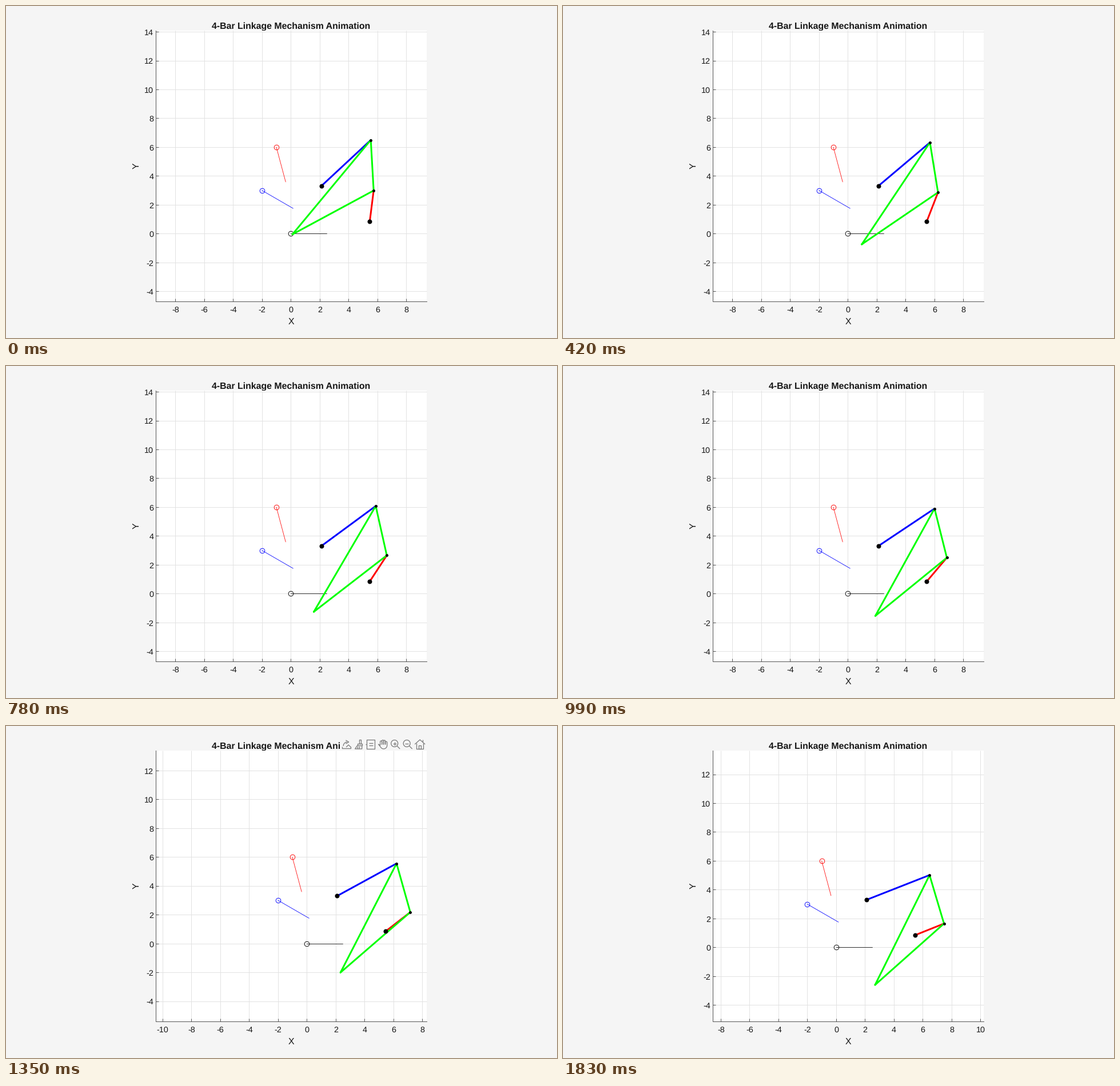
These frames come from a looping animation (964 by 581 pixels, 1.86 s). A matplotlib script:

```python
import numpy as np
import matplotlib.pyplot as plt
from matplotlib.animation import FuncAnimation
from matplotlib.collections import LineCollection
from matplotlib.patches import Rectangle

W, H, DPI = 964, 581, 100
FRAMES, INTERVAL = 62, 30
PT = 72 / DPI
LEFT, RIGHT, TOP, BOTTOM = 262, 735.6, 43.3, 517
UNIT = 25.24
TICK = 4.7
BG, INK, GRID, RULE = "#f5f5f5", "#161616", "#e2e2e2", "#555555"
BLUE, RED, GREEN = "#0000ff", "#ff0000", "#00ff00"

# Linkage geometry in data units
PIVOT_A = np.array([2.113, 3.297])
PIVOT_B = np.array([5.475, 0.847])
ROCKER, CRANK, COUPLER = 4.69, 2.158, 3.509
TIP_ALONG, TIP_SIDE = 6.22, -5.79
START_ANGLE = 82.8
POSES = [((0, 0), 0, "black"), ((-2, 3), -30, BLUE), ((-1, 6), -75, RED)]

# The view is dragged by hand: plot origin in pixels before, midway and after
HOME, PULLED, DROPPED = np.array([[498.2, 398.4], [526.1, 380.6], [477.8, 387.4]])
DRAG_START, DRAG_TURN, DRAG_END = 38, 45, 52

plt.rcParams["font.family"] = "Liberation Sans"
plt.rcParams["text.hinting"] = "none"
fig = plt.figure(figsize=(W / DPI, H / DPI), dpi=DPI, facecolor=BG)
ax = fig.add_axes([0, 0, 1, 1])
ax.set_xlim(0, W)
ax.set_ylim(H, 0)
ax.axis("off")

panel = Rectangle((LEFT, TOP), RIGHT - LEFT, BOTTOM - TOP, fc="white", ec="none", zorder=1)
ax.add_patch(panel)


def label(x, y, text, size, **kw):
    return ax.text(x, y, text, fontsize=size * PT, color=INK, **kw)


def stroke(color, width, z):
    line, = ax.plot([], [], color=color, lw=width * PT, zorder=z,
                    solid_capstyle="round", solid_joinstyle="round")
    line.set_clip_path(panel)
    return line


def dots(size, z, color="black", **kw):
    line, = ax.plot([], [], "o", color=color, ms=size * PT, zorder=z, **kw)
    line.set_clip_path(panel)
    return line


def segments(paths, color, width, z):
    return ax.add_collection(LineCollection(paths, colors=color, linewidths=width * PT,
                                            zorder=z))


label(498.6, 39.9, "4-Bar Linkage Mechanism Animation", 15.9,
      weight="bold", ha="center", zorder=0.5)
label(498.6, 557, "X", 15.9, ha="center")
label(228.8, 279.6, "Y", 15.9, rotation=90, ha="center", va="center")

grid = segments([], GRID, 1, 2)
ticks = segments([], RULE, 1, 3)
ax.plot([LEFT, LEFT, RIGHT], [TOP, BOTTOM, BOTTOM], color=RULE, lw=PT, zorder=3)

VALUES = range(-12, 17, 2)
x_labels = {v: label(0, 535.6, str(v), 14.4, ha="center") for v in VALUES}
y_labels = {v: label(258.4, 0, str(v), 14.4, ha="right") for v in VALUES}

pose_marks = [(np.array(p, float), np.radians(a), stroke(c, 0.8, 4),
               dots(8.6, 4, c, mfc="none", mew=0.9 * PT)) for p, a, c in POSES]
rocker = stroke(BLUE, 3, 5)
crank = stroke(RED, 3, 5)
coupler = stroke(GREEN, 3, 6)
pivots = dots(8, 7, mew=0)
joints = dots(5, 7, mew=0)


# Toolbar icons, each drawn around (0, 0)
def arc(cx, cy, r, a0=0, a1=360, n=24):
    t = np.radians(np.linspace(a0, a1, n))
    return list(zip(cx + r * np.cos(t), cy + r * np.sin(t)))


def box(x, y, w, h):
    return [(x, y), (x + w, y), (x + w, y + h), (x, y + h), (x, y)]


def bar(x, y, half):
    return [(x - half, y), (x + half, y)]


def share_icon():
    head = arc(1, -4, 3.5, -120, 120, 3)
    return [arc(2, 3, 7, 180, 265), head, arc(4, 5, 4, 180, 360, 3),
            [(-7, 4), (-7, 7), (8, 7), (8, 4)]]


def brush_icon():
    skirt = [(-2, 2), (-6, 8), (6, 8), (6, 2)]
    bristles = [[(x, 4), (x - 1, 8)] for x in (-1, 2)]
    return [box(1, -8, 3, 7), box(-2, -1, 8, 3), skirt, *bristles]


def tip_icon():
    return [box(-7, -8, 14, 16), bar(0.5, -2, 3.5), bar(0.5, 2, 3.5), bar(-8, 0, 1)]


def hand_icon():
    outline = [(-5, 2)]
    for i in range(4):
        x, y = 3 * i - 3.5, 0.9 * (i - 1.3) ** 2 - 6
        outline += [(x - 1.5, 0), *arc(x, y, 1.5, 180, 360, 8), (x + 1.5, 0)]
    return [outline + arc(1, 2, 6, 0, 150) + [(-8, 0), (-5, 2)]]


def zoom_icon(plus):
    parts = [arc(-1.5, -1.5, 6), [(3, 3), (8, 8)], bar(-1.5, -1.5, 3)]
    return parts + [[(y, x) for x, y in parts[-1]]] * plus


def home_icon():
    return [[(-9, 0), (0, -8), (9, 0)], [(-6, -2), (-6, 8), (6, 8), (6, -2)],
            box(-2, 2, 4, 6), [(5, -4), (5, -8)]]


icons = [share_icon(), brush_icon(), tip_icon(), hand_icon(),
         zoom_icon(True), zoom_icon(False), home_icon()]
icon_paths = [np.array(path) + (595.2 + 21.5 * i, 32)
              for i, icon in enumerate(icons) for path in icon]
toolbar = [ax.add_patch(Rectangle((585, 23), 154, 20, fc=BG, ec="none", zorder=8)),
           segments(icon_paths, "#7c7c7c", 1.3, 9)]


def solve(step):
    """Joint positions of the linkage after `step` degrees of crank travel."""
    t = np.radians(START_ANGLE - step)
    q = PIVOT_B + CRANK * np.array([np.cos(t), np.sin(t)])
    d = np.hypot(*(q - PIVOT_A))
    u = (q - PIVOT_A) / d
    a = (ROCKER**2 - COUPLER**2 + d**2) / (2 * d)
    p = PIVOT_A + a * u + np.sqrt(ROCKER**2 - a**2) * np.array([-u[1], u[0]])
    e = (q - p) / COUPLER
    tip = p + TIP_ALONG * e + TIP_SIDE * np.array([-e[1], e[0]])
    return p, q, tip


def view_origin(step):
    out = np.clip((step - DRAG_START) / (DRAG_TURN - DRAG_START), 0, 1)
    back = np.clip((step - DRAG_TURN) / (DRAG_END - DRAG_TURN), 0, 1)
    return HOME + out * (PULLED - HOME) + back * (DROPPED - PULLED)


def update(step):
    origin = view_origin(step)

    def place(line, *points):
        line.set_data(*(origin + UNIT * np.array(points) * [1, -1]).T)

    grid_lines, tick_lines = [], []
    for v in VALUES:
        x, y = origin + UNIT * v * np.array([1, -1])
        show_x, show_y = LEFT < x < RIGHT, TOP < y < BOTTOM
        x_labels[v].set(x=x + 0.4, visible=show_x)
        y_labels[v].set(y=y + 5.8, visible=show_y)
        if show_x:
            grid_lines.append([(x, TOP), (x, BOTTOM)])
            tick_lines.append([(x, BOTTOM), (x, BOTTOM - TICK)])
        if show_y:
            grid_lines.append([(LEFT, y), (RIGHT, y)])
            tick_lines.append([(LEFT, y), (LEFT + TICK, y)])
    grid.set_segments(grid_lines)
    ticks.set_segments(tick_lines)

    for pos, angle, line, ring in pose_marks:
        place(line, pos, pos + 2.5 * np.array([np.cos(angle), np.sin(angle)]))
        place(ring, pos)

    p, q, tip = solve(step)
    place(rocker, PIVOT_A, p)
    place(crank, PIVOT_B, q)
    place(coupler, tip, p, q, tip)
    place(pivots, PIVOT_A, PIVOT_B)
    place(joints, p, q)

    for part in toolbar:
        part.set_visible(DRAG_START <= step < DRAG_END)
    return []


anim = FuncAnimation(fig, update, frames=FRAMES, interval=INTERVAL,
                     init_func=lambda: update(0), repeat=True, repeat_delay=0, blit=False)
plt.show()
```
